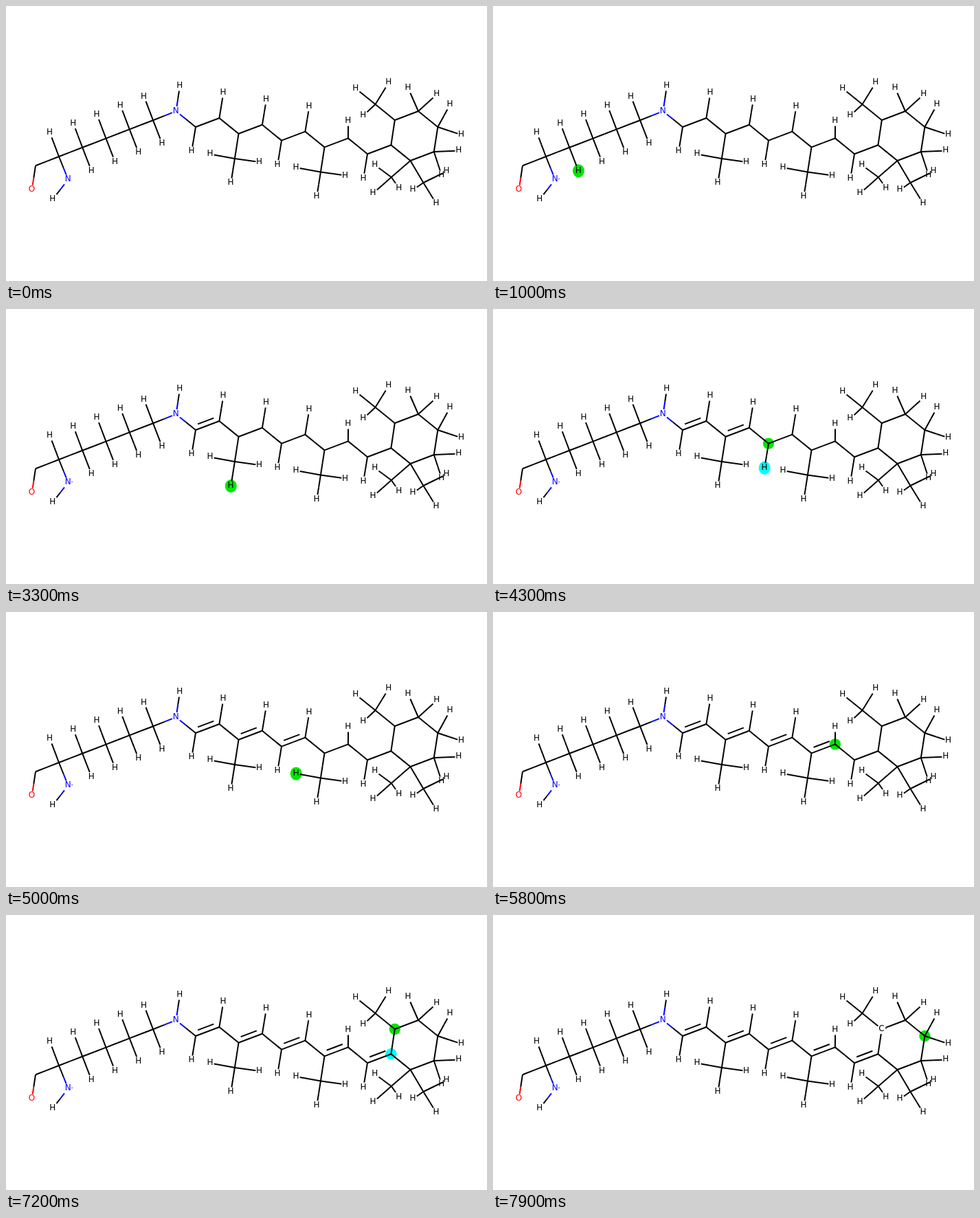
An HTML page with a canvas for the animation above (8 s loop, 700 by 400 pixels).

```html
<!DOCTYPE html>
<html>
<head>
<meta charset="utf-8">
<style>
html, body { margin: 0; width: 100%; height: 100%; overflow: hidden; background: #fff; }
canvas { display: block; }
</style>
</head>
<body>
<canvas id="stage" width="700" height="400"></canvas>
<script>
const ctx = document.getElementById('stage').getContext('2d');
const VALENCE = { H: 1, O: 2, N: 3, C: 4 };
const COLOR = { H: '#000', C: '#000', N: '#00f', O: '#f00' };
const STEP = 100, COUNT = 80;
const atoms = [], bonds = [];

// ---- Molecule, in the order the atoms are visited ----
function add(el, x, y, ...links) {
  const atom = { el, x, y, bonds: [], free: VALENCE[el], chargedAt: Infinity };
  atoms.push(atom);
  for (const other of links) {
    const bond = { a: other, b: atom, doubleAt: Infinity };
    bonds.push(bond);
    for (const end of [other, atom]) { end.bonds.push(bond); end.free--; }
  }
  return atom;
}
const hydrogens = (c, ...offsets) => offsets.map(([dx, dy]) => add('H', c.x + dx, c.y + dy, c));

// Lysine side chain
const amine = add('N', 90.5, 252.5);
add('H', 68, 281, amine);
const alpha = add('C', 77, 219, amine);
const up = [-13.1, -34.6], down = [13.2, 34];
hydrogens(alpha, up);
let last = alpha;
for (let k = 1; k < 5; k++) {
  last = add('C', 77 + 34.25 * k, 219 - 13.2 * k, last);
  hydrogens(last, ...(k % 2 ? [up, down] : [down, up]));
}
last = add('N', 247.5, 153, last);
add('H', 253, 116.5, last);

// Conjugated chain
for (let k = 0; k < 5; k++) {
  const x = 276 + 62.5 * k, y = 176 + 9.8 * k;
  if (k % 2) {
    const methyl = add('C', x - 5.6, y + 36.2);
    hydrogens(methyl, [-35.7, -6.5], [36, 5], [-5.6, 35.5]);
    last = add('C', x, y, last, methyl);
  } else {
    last = add('C', x, y, last);
    hydrogens(last, [-5.8, 35.5]);
  }
  last = add('C', x + 34.4, y - 13, last);
  if (k < 4) hydrogens(last, k < 3 ? [6, -36.5] : [0.2, -25]);
}

// Ring
const joint = last;
const methyl = add('C', 537.5, 143);
const topH = hydrogens(methyl, [-28.5, -23], [19.5, -31.5], [-17.5, 16.5])[1];
last = add('C', 565.8, 166, joint, methyl);
last = add('C', 600, 153, last);
hydrogens(last, [-14.7, -33.5], [27, -24.5]);
last = add('C', 628.4, 176, last);
hydrogens(last, [17.8, -32.5], [34.5, 11.5]);
last = add('C', 622.8, 212, last);
hydrogens(last, [36.2, -1.5], [11.3, 34.5]);
const quaternary = add('C', 588.5, 225, last, joint);
hydrogens(add('C', 560.8, 249, quaternary), [-23.8, -17.5], [-26.5, 23.5], [11.2, 16]);
hydrogens(add('C', 607.4, 257, quaternary), [-15, 10.5], [33.8, -16.5], [18.8, 30.5]);
add('O', 37.7, 267.5, add('C', 43, 232.3, alpha));

// ---- Valence search: each entry is [current atom, inspected neighbour] ----
const steps = [[]];
for (const atom of atoms) {
  steps.push([atom]);
  if (!atom.free) continue;
  for (const bond of atom.bonds) {
    const other = bond.a === atom ? bond.b : bond.a;
    steps.push([atom, other]);
    if (!other.free) continue;
    bond.doubleAt = steps.length;
    atom.free--;
    other.free--;
    steps.push([atom, other]);
    break;
  }
  if (atom.free) {
    atom.chargedAt = steps.length;
    steps.push([atom]);
  }
}

// ---- Drawing ----
const labelled = (atom, n) => atom.el !== 'C' || n >= atom.chargedAt;

function line(x1, y1, x2, y2, color) {
  ctx.strokeStyle = color;
  ctx.beginPath();
  ctx.moveTo(x1, y1);
  ctx.lineTo(x2, y2);
  ctx.stroke();
}

function halo(atom, color, n) {
  const [rx, ry] = labelled(atom, n) ? [8.5, 9.6] : [8.2, 8.2];
  ctx.fillStyle = color;
  ctx.beginPath();
  ctx.ellipse(atom.x, atom.y, rx, ry, 0, 0, 7);
  ctx.fill();
}

// Half a bond, from its middle to the edge of the atom's label
function halfBond(atom, other, n) {
  const dx = other.x - atom.x, dy = other.y - atom.y;
  const cut = labelled(atom, n) ? Math.min(5.5 / Math.abs(dx), 7 / Math.abs(dy)) : 0;
  line(atom.x + dx / 2, atom.y + dy / 2, atom.x + dx * cut, atom.y + dy * cut, COLOR[atom.el]);
}

function drawBond({ a, b, doubleAt }, n) {
  halfBond(a, b, n);
  halfBond(b, a, n);
  if (n < doubleAt) return;
  const len = Math.hypot(b.x - a.x, b.y - a.y);
  const ux = (b.x - a.x) / len, uy = (b.y - a.y) / len;
  const ox = uy * 7, oy = -ux * 7, trim = 6;
  line(a.x + ox + ux * trim, a.y + oy + uy * trim,
       b.x + ox - ux * trim, b.y + oy - uy * trim, '#000');
}

function drawLabel(atom, n) {
  if (!labelled(atom, n)) return;
  ctx.fillStyle = COLOR[atom.el];
  ctx.font = '12px "DejaVu Sans", sans-serif';
  ctx.fillText(atom.el, atom.x - 0.3, atom.y + 2.9);
  if (n >= atom.chargedAt) {
    ctx.font = '8px "DejaVu Sans", sans-serif';
    ctx.fillText('-', atom.x + 5.8, atom.y + 1.8);
  }
}

function frame(now) {
  const n = Math.floor(now / STEP) % COUNT;
  const [current, neighbour] = steps[n];
  ctx.setTransform(1, 0, 0, 1, 0, 0);
  ctx.fillStyle = '#fff';
  ctx.fillRect(0, 0, 700, 400);
  // The topmost halo enlarges the drawing, so it is centred a little lower
  if (current === topH) ctx.translate(0, 1);
  ctx.lineWidth = 2;
  ctx.textAlign = 'center';
  if (current) halo(current, '#00e600', n);
  if (neighbour) halo(neighbour, '#0ff', n);
  bonds.forEach(bond => drawBond(bond, n));
  atoms.forEach(atom => drawLabel(atom, n));
}

const start = performance.now();
function loop() {
  frame(performance.now() - start);
  requestAnimationFrame(loop);
}
loop();
</script>
</body>
</html>
```
